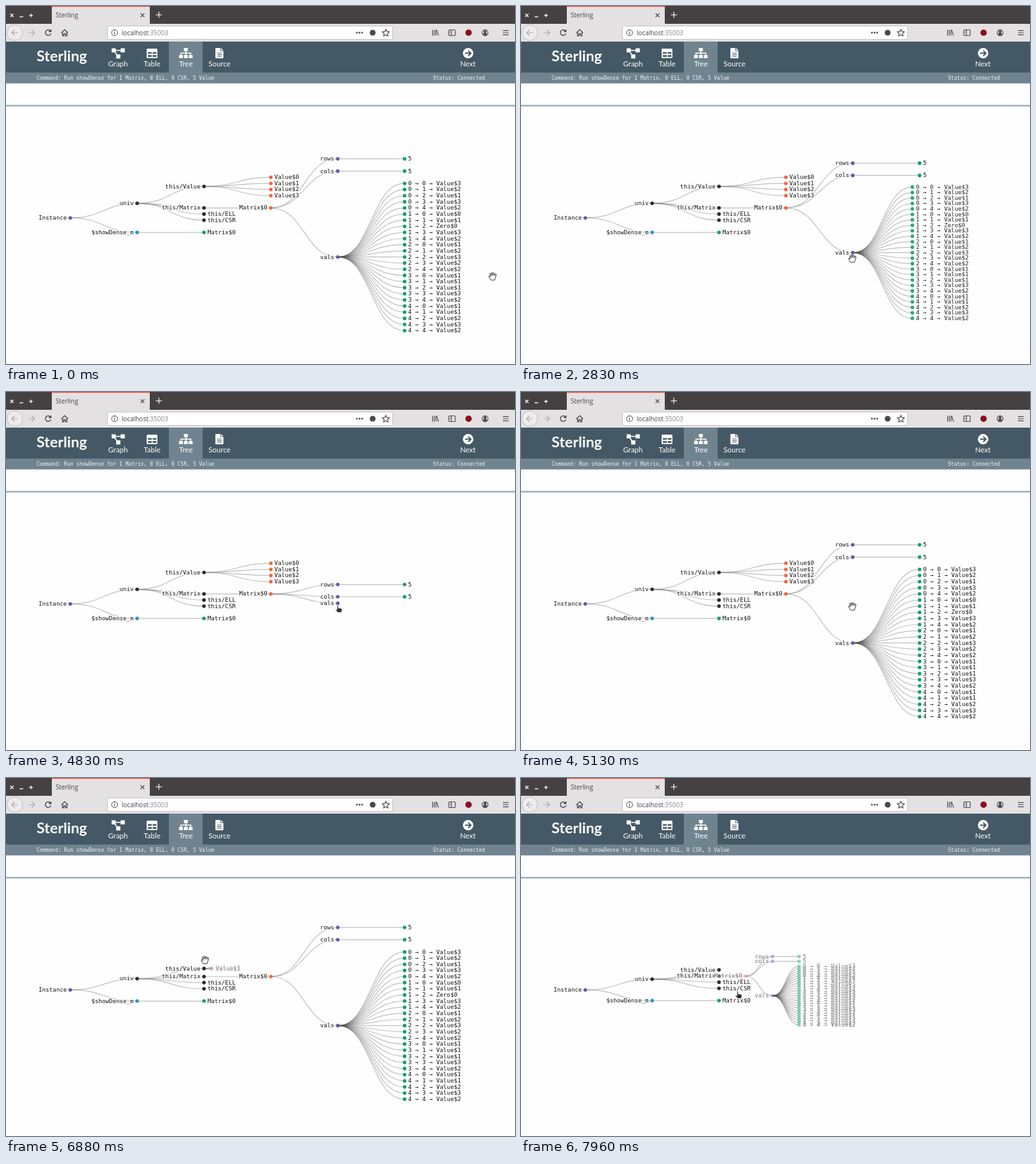
Animation of 800 by 563 pixels, one loop 8000 ms. Source, as an HTML page:

```html
<!DOCTYPE html>
<html lang="en">
<head>
<meta charset="utf-8">
<title>Sterling</title>
<style>
html, body { margin: 0; height: 100%; overflow: hidden; background: #fefefe; }
svg { display: block; width: 100vw; height: 100vh; }
.ui { font: 10px "Open Sans", "Noto Sans", sans-serif; fill: #444; }
.nav { font: 11.5px Lato, sans-serif; fill: #fff; text-anchor: middle; }
.logo { font: 700 23.4px Lato, sans-serif; fill: #fff; }
.bar { font: 8px "DejaVu Sans Mono", monospace; fill: #eef2f4; white-space: pre; }
.line { fill: none; stroke: #4a4a4c; stroke-width: 1.2; }
.white { fill: #fff; }
#links { fill: none; stroke: #555; stroke-opacity: .38; stroke-width: 1.2; }
#nodes text { font: 9.2px "DejaVu Sans Mono", monospace; fill: #111; white-space: pre; }
#nodes .halo { stroke: #fff; stroke-width: 2.76; stroke-linejoin: round; }
</style>
</head>
<body>
<svg viewBox="0 0 800 563">
  <rect width="800" height="563" fill="#fefefe"/>

  <!-- browser tabs -->
  <rect width="800" height="28.5" fill="#454142"/>
  <g class="line" style="stroke:#eee;stroke-width:1.5">
    <path d="M6.7 12.3l5 5m0-5l-5 5M21.5 17h5.5M36.5 14.8h5.6m-2.8-2.8v5.6"/>
    <path d="M235.5 13.8h9.6m-4.8-4.8v9.6" style="stroke-width:1.3"/>
  </g>
  <rect y="28" width="800" height="28.3" fill="#e4e1e3"/>
  <rect x="72" width="154" height="29" fill="#e4e1e3"/>
  <rect x="72" width="154" height="1.3" fill="#f0513c"/>
  <text class="ui" x="78" y="18">Sterling</text>
  <path class="line" d="M211.5 11.5l6 6m0-6l-6 6"/>

  <!-- browser toolbar -->
  <circle cx="13.8" cy="42" r="12.3" fill="#edebec" stroke="#bebbbd"/>
  <path class="line" style="stroke:#aaa7a9" d="M19 42H9m4.5-4.5L9 42l4.5 4.5M35 42h10m-4.5-4.5L45 42l-4.5 4.5"/>
  <path class="line" style="stroke-width:1.4" d="M69.8 39.2a4.4 4.4 0 1 0 .7 4M70.7 37v3.3h-3.4M87 42.3l5.2-5 5.2 5M88.7 41.5v5.2h2.2v-3.2h2.6v3.2h2.2v-5.2"/>
  <rect x="159.5" y="31.5" width="448" height="21" rx="2" fill="#fff" stroke="#c5c2c4"/>
  <circle class="line" style="stroke-width:1" cx="170.7" cy="42" r="4.7"/>
  <path class="line" d="M170.7 41v3.6m0-6v1.2"/>
  <text class="ui" x="181.8" y="45.7">localhost<tspan fill="#8b898a">:35003</tspan></text>
  <g fill="#4a4a4c">
    <circle cx="551.5" cy="42" r="1.4"/><circle cx="555.6" cy="42" r="1.4"/><circle cx="559.7" cy="42" r="1.4"/>
    <circle cx="576.3" cy="42" r="4.6"/>
  </g>
  <path class="line" d="M597 36.7l1.7 3.5 3.8.5-2.8 2.6.7 3.9-3.4-1.9-3.4 1.9.7-3.9-2.8-2.6 3.8-.5z"/>
  <path class="line" d="M670.5 37.5v9m2.7-9v9m2.6-9v9m1-9l3 9"/>
  <rect class="line" x="696" y="37.5" width="10" height="9" rx="1"/>
  <path class="line" d="M700 37.5v9m-2.5-6.5h1m-1 2h1"/>
  <circle cx="727" cy="42" r="5" fill="#8d0f1c"/>
  <circle class="line" cx="753" cy="42" r="4.6"/>
  <path fill="#4a4a4c" d="M750.8 40.2a2.2 2.2 0 0 1 4.4 0q0 1.7-1 2.4 2 .5 2.3 1.8-3.5 3-7 0 .3-1.3 2.3-1.8-1-.7-1-2.4z"/>
  <path class="line" d="M781 38.7h9m-9 3.3h9m-9 3.3h9"/>

  <!-- application header -->
  <rect y="56" width="800" height="49" fill="#445965"/>
  <rect x="256" y="56" width="53" height="49" fill="#708490"/>
  <rect y="104.7" width="800" height="17" fill="#708490"/>
  <text class="logo" x="48" y="87">Sterling</text>
  <g class="nav">
    <text x="176" y="95">Graph</text><text x="229.5" y="95">Table</text><text x="282.7" y="95">Tree</text>
    <text x="335.6" y="95">Source</text><text x="726" y="95">Next</text>
  </g>
  <g class="white">
    <path d="M166 66.5h6.5v6.5h-6.5zM180.2 66.5h6.5v6.5h-6.5zM173.2 76h6.5v6.5h-6.5z"/>
    <path d="M172 69.7h9M171 72l4 6" stroke="#fff" stroke-width="1.6"/>
    <rect x="221" y="67" width="17" height="15" rx="1.6"/>
    <path d="M279.6 66h6.2v5h-6.2zM272 77h6v5h-6zM279.7 77h6v5h-6zM287.3 77h6v5h-6z"/>
    <path d="M275 78v-4h15.4v4M282.7 70v8" fill="none" stroke="#fff" stroke-width="1.5"/>
    <path d="M330 66h6.8v4.7h4.9V81q0 1.3-1.2 1.3h-10.2q-1.2 0-1.2-1.3V67q0-1 .9-1zM337.8 66l3.9 3.8h-3.9z"/>
    <circle cx="726.3" cy="74.3" r="8.2"/>
  </g>
  <g fill="none" stroke="#445965">
    <path d="M223 72.5h6.1v2.6h-6.1zM230.5 72.5h6v2.6h-6zM223 77.3h6.1v2.6h-6.1zM230.5 77.3h6v2.6h-6z" fill="#445965" stroke="none"/>
    <path d="M332 74h7m-7 2.5h7m-7 2.5h7"/>
    <path d="M721.5 74.3h9m-4-4.2l4.2 4.2-4.2 4.2" stroke-width="2"/>
  </g>
  <text class="bar" x="48" y="116.3">Command: Run showDense for 1 Matrix, 0 ELL, 0 CSR, 5 Value</text>
  <text class="bar" x="671" y="116.3">Status: Connected</text>
  <rect y="155" width="800" height="1" fill="#d3dbdf"/>
  <rect y="156" width="800" height="1" fill="#93a5ad"/>
  <rect y="157" width="800" height="1" fill="#b3c0c5"/>
  <rect y="158" width="800" height="1" fill="#e6ebed"/>

  <g id="links"></g>
  <g id="nodes"></g>
  <g id="cursor">
    <path id="grab" fill="#fff" stroke="#222" stroke-width=".9" d="M-3 6L-6 1Q-6.500-.5-5-.5L-3.300 1-4.600-3.500Q-4.400-5-3.200-4.400L-2-1.200V-5.300Q-1.200-6.600-.2-5.400L.2-1.300 1.200-5Q2.400-6 3-4.600L2.600-.8 4.200-3.200Q5.600-3.600 5.500-2L4 3 3.200 6z"/>
    <path id="point" transform="translate(2 4)" fill="#2e2e2e" stroke="#fff" stroke-width=".8" d="M-3-5.500Q-2-6.600-1-5.500L-.6-1.600 3.500-.8Q5.400-.3 5.200 1.500L4.400 5.800H-1.600L-5 1.800Q-5.400.4-3.800.6L-2.400 1.600z"/>
  </g>
</svg>
<script>
const LOOP = 8000, FADE = 250, ROW = 9.646, COL = 105.1;
const PURPLE = '#5c5fa8', DARK = '#2a2c30', ORANGE = '#f2673c', GREEN = '#0fa070', TEAL = '#159fcc';
const $ = id => document.getElementById(id);

function el(name, attrs, parent) {
  const e = document.createElementNS('http://www.w3.org/2000/svg', name);
  for (const k in attrs) e.setAttribute(k, attrs[k]);
  return parent.appendChild(e);
}

// dy: rows below the parent, given gap (this/Value to this/Matrix) and whether vals is open
const nodes = [];
function add(parent, label, color, dy, left) {
  const node = { parent, label, color, dy, left, i: nodes.length, depth: parent ? parent.depth + 1 : 0 };
  nodes.push(node);
  return node;
}
const root = add(null, 'Instance', PURPLE, null, true);
const univ = add(root, 'univ', DARK, g => -(g / 2 + 3) / 2, true);
const show = add(root, '$showDense_m', TEAL, g => (g / 2 + 3) / 2, true);
const value = add(univ, 'this/Value', DARK, g => -g / 2 - 1, true);
const matrix = add(univ, 'this/Matrix', DARK, g => g / 2 - 1, true);
add(univ, 'this/ELL', DARK, g => g / 2);
add(univ, 'this/CSR', DARK, g => g / 2 + 1);
add(show, 'Matrix$0', GREEN, () => 0);
for (let k = 0; k < 4; k++) add(value, 'Value$' + k, ORANGE, () => k - 1.5);
const cell = add(matrix, 'Matrix$0', ORANGE, () => 0, true);
const rows = add(cell, 'rows', PURPLE, (g, open) => open ? -8 : -1.5, true);
const cols = add(cell, 'cols', PURPLE, (g, open) => open ? -6 : .5, true);
const vals = add(cell, 'vals', PURPLE, (g, open) => open ? 8 : 1.5, true);
add(rows, '5', GREEN, () => 0);
add(cols, '5', GREEN, () => 0);
[...'3213201z32123221113211232'].forEach((v, k) =>
  add(vals, `${k / 5 | 0} → ${k % 5} → ${v === 'z' ? 'Zero$0' : 'Value$' + v}`, GREEN, () => k - 12));

for (const n of nodes) {
  if (n.parent) n.link = el('path', {}, $('links'));
  n.g = el('g', {}, $('nodes'));
  el('circle', { r: 2.8, fill: n.color }, n.g);
  for (const layer of ['halo', 'label']) {
    const attrs = { class: layer, x: n.left ? -5.5 : 5.5, y: 2.9, 'text-anchor': n.left ? 'end' : 'start' };
    el('text', attrs, n.g).textContent = n.label;
  }
}

// Hidden nodes sit on their nearest visible ancestor.
function layout(closed) {
  const gap = closed.includes(value) ? 1 : 3.5, open = !closed.includes(vals), pose = [];
  for (const n of nodes) {
    const p = n.parent && pose[n.parent.i];
    if (!p) pose.push({ x: 101, y: 333.2, a: 1 });
    else if (!p.a || closed.includes(n.parent)) pose.push({ x: p.x, y: p.y, a: 0 });
    else pose.push({ x: 101 + n.depth * COL, y: p.y + ROW * n.dy(gap, open), a: 1 });
  }
  return pose;
}
const steps = [[0, []], [2756, [vals]], [4803, []], [6709, [value]], [7827, [value, matrix]]]
  .map(([at, closed]) => ({ at, pose: layout(closed) }));

// time, x, y
const path = [
  [0, 765, 425], [460, 765, 425], [670, 769, 421], [920, 768, 423], [1380, 680, 433], [1710, 598, 429],
  [1750, 598, 429], [2380, 521, 397], [3380, 521, 397], [3830, 521, 337], [5330, 521, 337],
  [6040, 333, 307], [6130, 325, 293], [6170, 324, 292], [6290, 313, 286], [7050, 313, 286],
  [7250, 313, 315], [7420, 313, 315], [7460, 313, 314], [7810, 313, 314], [7960, 340, 337], [8000, 342, 338]];
const pointing = [[1190, 1600], [2300, 2780], [3800, 4870], [6250, 6750], [7420, 8000]];

const mix = (a, b, e) => a + (b - a) * e;
const ease = t => t < .5 ? 4 * t ** 3 : 1 - 4 * (1 - t) ** 3;

function drawTree(t) {
  const i = steps.findLastIndex(s => s.at <= t);
  const to = steps[i], from = steps[Math.max(0, i - 1)];
  const e = ease(Math.min(1, (t - to.at) / FADE));
  const now = nodes.map(({ i }) => {
    const a = from.pose[i], b = to.pose[i];
    return { x: mix(a.x, b.x, e), y: mix(a.y, b.y, e), a: mix(a.a, b.a, e) };
  });
  for (const n of nodes) {
    const { x, y, a } = now[n.i];
    n.g.setAttribute('transform', `translate(${x} ${y})`);
    n.g.setAttribute('fill-opacity', a);
    n.g.setAttribute('stroke-opacity', a);
    if (!n.parent) continue;
    const p = now[n.parent.i], m = (p.x + x) / 2;
    n.link.setAttribute('d', `M${p.x} ${p.y}C${m} ${p.y} ${m} ${y} ${x} ${y}`);
  }
}

function drawCursor(t) {
  const k = path.findIndex(p => p[0] > t), a = path[k - 1], b = path[k];
  const e = (t - a[0]) / (b[0] - a[0]);
  $('cursor').setAttribute('transform', `translate(${mix(a[1], b[1], e)} ${mix(a[2], b[2], e)})`);
  const hit = pointing.some(([from, to]) => t >= from && t < to);
  $('point').style.display = hit ? '' : 'none';
  $('grab').style.display = hit ? 'none' : '';
}

const start = performance.now();
function frame() {
  const t = (performance.now() - start) % LOOP;
  drawTree(t);
  drawCursor(t);
  requestAnimationFrame(frame);
}
frame();
</script>
</body>
</html>
```
